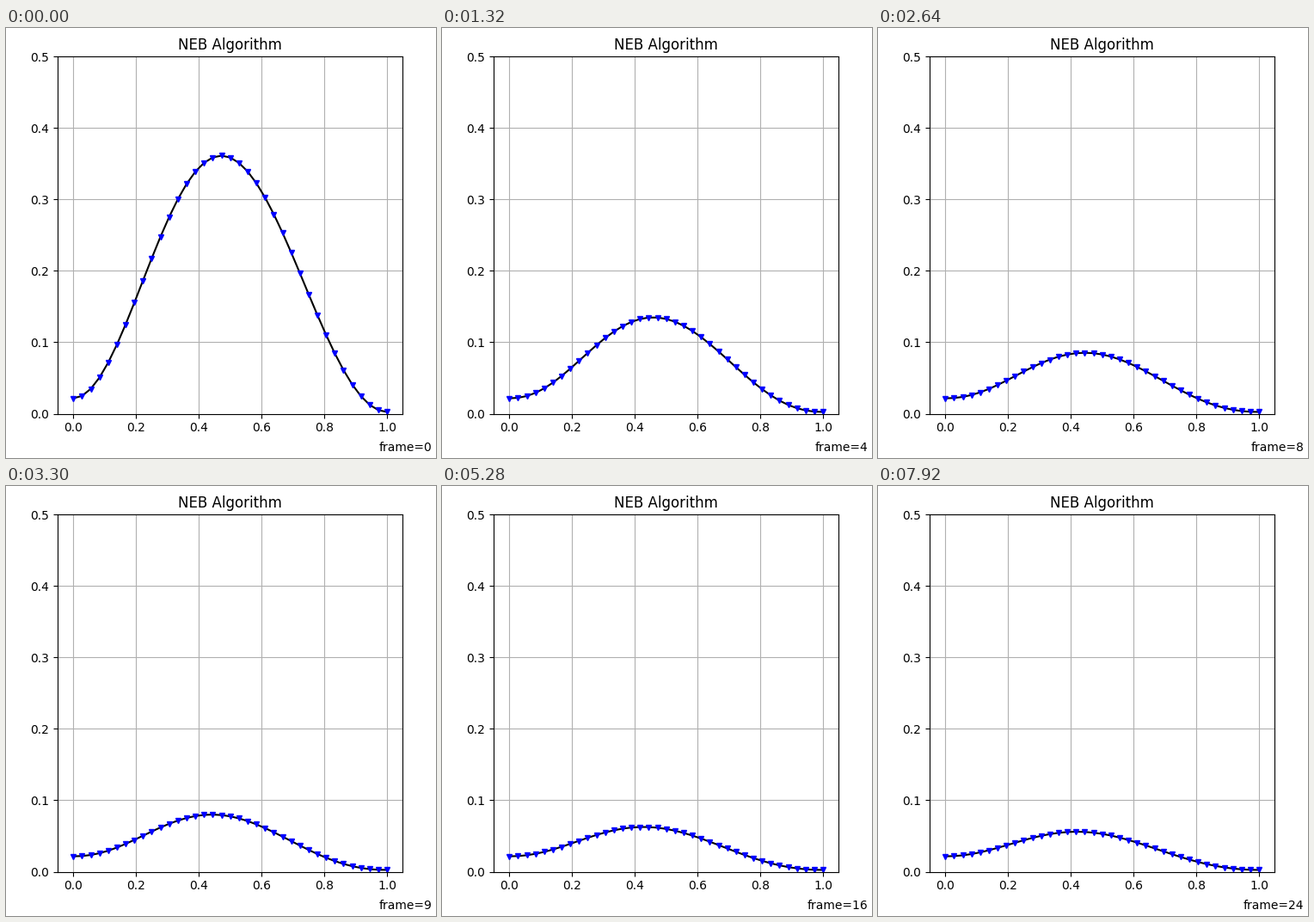
These frames come from a looping animation (500x500 px, 8 s). A matplotlib script:

```python
import numpy as np
import matplotlib.pyplot as plt
from matplotlib.animation import FuncAnimation

LOOP_MS = 8000
INTERVAL = 40
STEP_MS = 330
N_IMAGES = 37
E_START, E_END = 0.0216, 0.0025

x = np.linspace(0, 1, N_IMAGES)


def hump(u, power):
    """Unit bump, flat at both ends."""
    return np.sin(np.pi * u) ** (2 * power)


def excess(step):
    """Barrier still to relax: a fast and a slow decay."""
    return 0.245 * 0.643 ** step + 0.0666 * 0.8963 ** step - 0.0048


def band(step):
    """Energies along the band after the given number of steps."""
    ends = (E_START + E_END) / 2 + (E_START - E_END) / 2 * np.cos(np.pi * x)
    relaxed = 0.042 * hump(x + 0.2 * x * (1 - x), 1.05)
    narrowing = 1.25 - 0.25 * np.exp(-step / 3.5)
    extra = excess(step) * hump(x + 0.15 * x * (1 - x) ** 2, narrowing)
    return ends + relaxed + extra


fig = plt.figure(figsize=(5, 5), dpi=100)
ax = fig.add_axes([60 / 500, 51.47 / 500, 401.4 / 500, 415.3 / 500])
ax.set_title("NEB Algorithm")
ax.set_xlim(-0.05, 1.05)
ax.set_ylim(0, 0.5)
ax.grid(True)
line, = ax.plot(x, band(0), "k-")
points, = ax.plot(x, band(0), "bv", markersize=5)
label = fig.text(0.99, 0.01, "frame=0", ha="right", va="bottom")


def update(i):
    step = i * INTERVAL // STEP_MS
    energy = band(step)
    line.set_ydata(energy)
    points.set_ydata(energy)
    label.set_text(f"frame={step}")
    return line, points, label


anim = FuncAnimation(fig, update, frames=LOOP_MS // INTERVAL,
                     interval=INTERVAL, repeat=True, repeat_delay=0)
plt.show()
```
